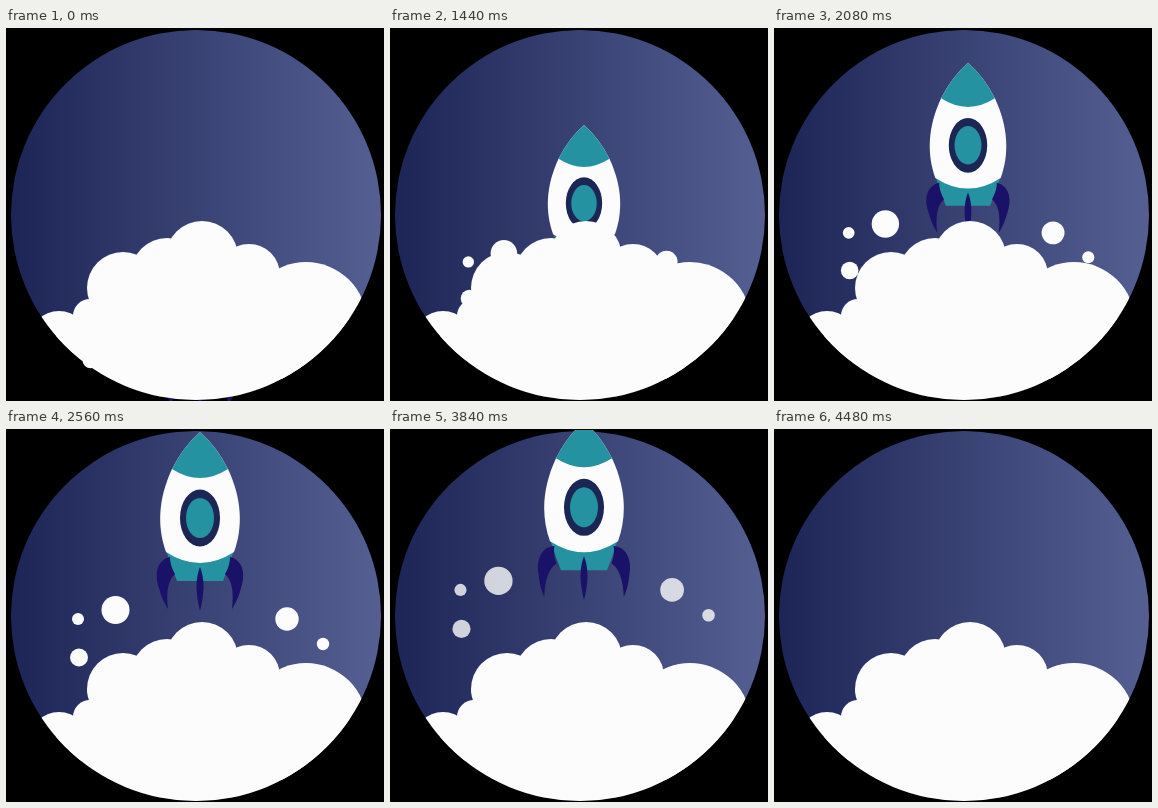
An HTML page for the animation above (4.56 s loop, 378 by 373 pixels).

```html
<!DOCTYPE html>
<html lang="en">
<head>
<meta charset="utf-8">
<title>Rocket launch</title>
<style>
  html, body { margin: 0; height: 100%; overflow: hidden; background: #000; }
  svg { display: block; width: 100vw; height: 100vh; }
</style>
</head>
<body>
<svg viewBox="0 0 378 373">
  <defs>
    <linearGradient id="sky">
      <stop offset="0" stop-color="#1c2555"/>
      <stop offset="1" stop-color="#565f92"/>
    </linearGradient>
    <clipPath id="disc"><circle cx="190" cy="187" r="185"/></clipPath>
    <path id="fin" d="M-30 125C-43 128-46 142-41 156Q-38 168-32 177C-34 160-32 148-25 142Q-30 134-30 125Z"/>
  </defs>
  <circle cx="190" cy="187" r="185" fill="url(#sky)"/>

  <g id="bubbles" fill="#fcfcfc">
    <circle cx="-122" cy="-12" r="6"/>
    <circle cx="-84.5" cy="-21" r="14"/>
    <circle cx="-121" cy="26.5" r="9"/>
    <circle cx="87" cy="-12" r="11.7"/>
    <circle cx="123" cy="13" r="6.2"/>
  </g>

  <g id="rocket">
    <path fill="#2492a0" d="M-34 118H34L28 136 23 149H-23L-28 136Z"/>
    <path fill="#fcfcfc" d="M0 0Q-17 15-28 37C-42 67-43 95-34 120Q0 142 34 120C43 95 42 67 28 37Q17 15 0 0Z"/>
    <path fill="#2492a0" d="M0 0Q-17 15-28 37Q0 55 28 37Q17 15 0 0Z"/>
    <ellipse cy="86" rx="20" ry="28.5" fill="#1c2654"/>
    <ellipse cy="86" rx="14" ry="20" fill="#2492a0"/>
    <g fill="#1a1268">
      <path d="M0 135Q-7 152 0 179Q7 152 0 135Z"/>
      <use class="fin" href="#fin"/>
      <g transform="scale(-1 1)"><use class="fin" href="#fin"/></g>
    </g>
  </g>

  <g clip-path="url(#disc)" fill="#fcfcfc">
    <circle cx="53" cy="313" r="30"/>
    <circle cx="84" cy="288" r="17"/>
    <circle cx="117" cy="260" r="36"/>
    <circle cx="161" cy="246" r="36"/>
    <circle cx="196" cy="229" r="36"/>
    <circle cx="243" cy="247" r="31"/>
    <circle cx="300" cy="295" r="61"/>
    <path d="M84 250H300V290H345V373H50V290H84Z"/>
  </g>
  <rect width="378" height="1"/>
</svg>
<script>
const LOOP = 4560, STEP = 80;
const rocket = document.getElementById('rocket');
const bubbles = document.getElementById('bubbles');
const fins = document.querySelectorAll('.fin');
const span = (t, from, to) => Math.min(1, Math.max(0, (t - from) / (to - from)));

function draw(t) {
  const left = 26 * (1 - span(t, 480, 2560));      // steps until the rocket hovers
  const rise = 4.2 * left + 0.18 * left * left;    // slowing climb
  const dip = span(t, 3040, 3600);                 // sinks and spreads its fins
  const exit = span(t, 3600, 4480);

  const tip = 3 + rise + 25 * dip - 220 * exit ** 1.4;
  rocket.setAttribute('transform', `translate(194 ${tip}) scale(${1 - 0.0065 * left})`);
  for (const fin of fins) fin.setAttribute('transform', `rotate(${9 * dip} -28 127)`);

  const y = 202 + 0.46 * rise - 106 * exit;
  const size = 1 - 0.0037 * left + 0.046 * exit;
  bubbles.setAttribute('transform', `translate(194 ${y}) scale(${size})`);
  bubbles.setAttribute('opacity', 1 - span(t, 3680, 4480));
}

const start = performance.now();
function tick() {
  const t = (performance.now() - start) % LOOP;
  draw(Math.floor(t / STEP) * STEP);
  requestAnimationFrame(tick);
}
tick();
</script>
</body>
</html>
```
